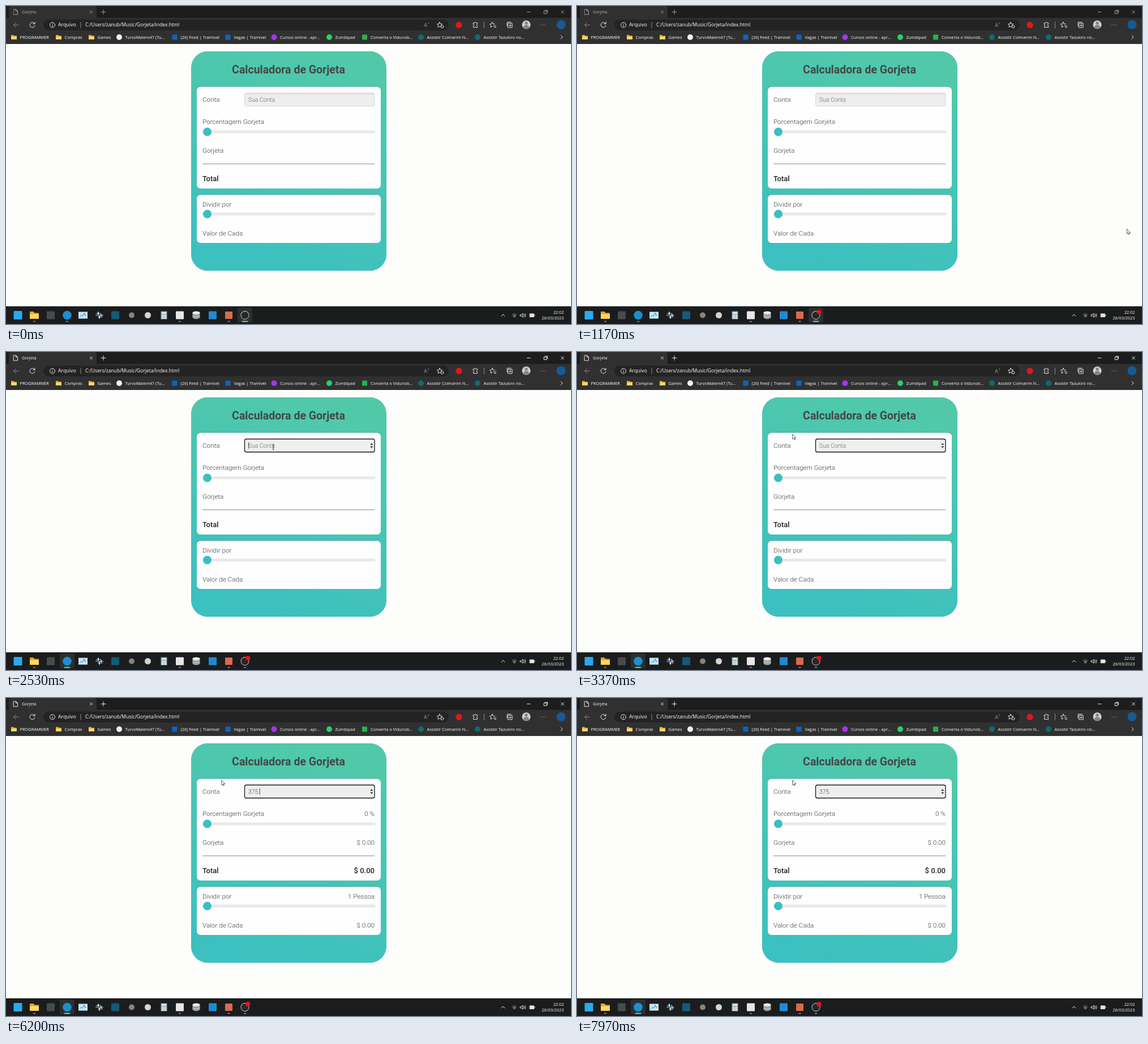
Write an HTML page that moves like this. It is 998 by 561 pixels and loops after 8 s.

```html
<!DOCTYPE html>
<html lang="pt">
<head>
<meta charset="utf-8">
<title>Gorjeta</title>
<style>
  html, body { margin: 0; height: 100%; overflow: hidden; background: #fdfdfc; }
  svg { display: block; width: 100vw; height: 100vh; }
  .ui { font: 7.4px "Open Sans", "Noto Sans", sans-serif; fill: #fff; }
  .page { font: 300 11.7px Roboto, sans-serif; fill: #3e3e3e; }
  .page .title { font-weight: 700; font-size: 19.5px; fill: #434846; text-anchor: middle; }
  .page .strong { font-weight: 500; font-size: 13px; fill: #222; }
  .page .entry { font-size: 10.4px; }
  .end { text-anchor: end; }
  .line { fill: none; stroke: #e6e6e6; stroke-width: 1; stroke-linecap: round; stroke-linejoin: round; }
  .dim { stroke: #888; }
  .panel { fill: #fefefe; filter: drop-shadow(0 -.3px .6px #4564); }
</style>
</head>
<body>
<svg viewBox="0 0 998 561" preserveAspectRatio="none">
  <defs>
    <linearGradient id="teal" x1=".35" y1="1" x2=".65" y2="0">
      <stop stop-color="#3cc0c0"/><stop offset="1" stop-color="#51c9a9"/>
    </linearGradient>
    <linearGradient id="inset" x2="0" y2="1">
      <stop stop-color="#d9d9d9"/><stop offset=".16" stop-color="#ededed"/><stop offset="1" stop-color="#efefef"/>
    </linearGradient>
  </defs>

  <!-- Browser -->
  <g class="ui">
    <path fill="#1d1d1d" d="M0 0H998V22H0Z"/>
    <path fill="#303030" d="M0 21H5V4Q5 0 9 0H156Q160 0 160 4V21H998V67H0Z"/>
    <rect x="66" y="24" width="716" height="19" rx="9.5" fill="#232323"/>
    <g id="titlebar">
      <path class="line" d="M13.5 6h4l3 3v6h-7zM17.5 6v3h3M148.500 8.500l4 4m0-4l-4 4M168 10.500h8m-4-4v8"/>
      <path class="line" d="M920.5 10.500h5.500M950.500 9h4.500v4.500h-4.500zM952 7.500h4.500v4.500M980.500 8l5 5m0-5l-5 5"/>
      <text x="28" y="13.2">Gorjeta</text>
    </g>
    <path class="line dim" d="M22.5 33.500h-9m4-4l-4 4 4 4"/>
    <path class="line" d="M50.5 31a4.500 4.500 0 1 0 .5 3.500M51 28.500v3h-3"/>
    <circle class="line" cx="82" cy="33.5" r="4.5"/>
    <path class="line" d="M82 33v3M82 31v.1"/>
    <text x="92" y="36.4" font-size="8.8">Arquivo</text>
    <path class="line dim" d="M132 28.500v10"/>
    <text x="140" y="36.4" font-size="8.57">C:/Users/zanub/Music/Gorjeta/index.html</text>
    <text x="738" y="37" font-size="9.5" fill="#999">A</text>
    <path class="line dim" d="M746 29q1.500 1.500 0 3"/>
    <g class="line">
      <path d="M766 28.500l1.400 3 3.200.4-2.300 2.300.6 3.200-2.900-1.600-2.900 1.600.6-3.200-2.300-2.300 3.200-.4z"/>
      <circle cx="770.5" cy="36.5" r="2.3" fill="#232323"/>
      <path d="M825.5 30h2.300a1.400 1.400 0 0 1 2.800 0h2v2.300a1.400 1.400 0 0 0 0 2.800v2.500h-7.100v-2.500a1.400 1.400 0 0 0 0-2.800z"/>
      <path class="dim" d="M844.5 28v11"/>
      <path d="M859 28.500l1.300 3 3.200.4M859 28.500l-1.400 3-3.200.4 2.300 2.300-.6 3.200 2.700-1.500M861 35h4.500m-3 2.500h3"/>
      <path d="M885 35.500v-6q0-1 1-1h6M887 30.500h7v7.500h-7zM890.500 32.500v3.500m-1.750-1.750h3.500"/>
    </g>
    <circle cx="919" cy="33" r="7.5" fill="#d2d0ce"/>
    <path fill="#87827f" d="M919 27.500a2.700 2.700 0 0 1 0 5.400 2.700 2.700 0 0 1 0-5.400M914 38q0-4.500 5-4.500t5 4.500q-5 4-10 0"/>
    <path class="line" d="M945 33.500v.01M948.500 33.500v.01M952 33.500v.01" stroke-width="1.6"/>
    <circle cx="800" cy="33.5" r="5.5" fill="#e5161d"/>
    <circle cx="980.5" cy="33" r="8" fill="#175a94"/>
    <g id="bookmarks"></g>
    <path class="line" d="M980 52l3 3-3 3"/>
  </g>

  <!-- Calculator -->
  <g class="page">
    <rect x="327" y="80" width="345" height="387" rx="29" fill="url(#teal)" style="filter:drop-shadow(0 .3px .7px #0005)"/>
    <text class="title" x="499" y="118.7">Calculadora de Gorjeta</text>
    <rect class="panel" x="337" y="142.5" width="325" height="179.5" rx="6.5"/>
    <rect class="panel" x="337" y="333" width="325" height="85" rx="6.5"/>
    <rect id="box" x="421.5" y="153.5" width="229.5" height="23" rx="3"/>
    <path id="spinner" fill="#333" d="M643.3 163.700l2.500-3.200 2.500 3.200zM643.300 166.200l2.500 3.200 2.500-3.200z"/>
    <text id="entry" class="entry" x="428" y="168.5"></text>
    <path id="caret" stroke="#222" stroke-width=".8" d="M0 159.500v11"/>
    <path stroke="#8d8d8d" d="M347 278.500H651"/>
    <g id="rows"></g>
  </g>

  <!-- Taskbar -->
  <g class="ui">
    <path fill="#1b1c1d" d="M0 529.700H998V561H0Z"/>
    <rect id="active" y="532" width="26" height="26" rx="3" fill="#2c2e2f"/>
    <g id="apps"></g>
    <circle id="recording" cx="427.5" cy="540" r="4" fill="#f01010"/>
    <path class="line" d="M875 547l3-3 3 3"/>
    <g class="line">
      <path class="dim" d="M894 544.500q4-3.500 8 0"/>
      <path d="M895.5 546.500q2.500-2 5 0M897 548.300q1-.8 2 0"/>
      <path d="M908.5 544.500h2l2.500-2.300v7l-2.500-2.300h-2zM915 544q1.500 1.700 0 3.500M916.800 542.500q2.700 3.200 0 6.500"/>
      <path fill="#e6e6e6" d="M925.5 543h7v5.500h-7zM934 545v1.500"/>
    </g>
    <text class="end" x="985.5" y="543">22:02</text>
    <text class="end" x="985.5" y="553">26/03/2023</text>
  </g>

  <path id="arrow" fill="#fff" stroke="#333" stroke-width=".8" d="M0 0V8.600L2 6.900 3.300 9.900 4.600 9.300 3.400 6.500H6.200Z"/>
  <path id="beam" fill="none" stroke="#222" stroke-width=".8" d="M-1.500 0h3M0 0v9M-1.500 9h3"/>
</svg>

<script>
const $ = id => document.getElementById(id);
const set = (id, attrs) => { for (const k in attrs) $(id).setAttribute(k, attrs[k]); };
const show = (id, on) => set(id, { visibility: on ? "visible" : "hidden" });

const circle = (x, y, r, color) => `<circle cx="${x}" cy="${y}" r="${r}" fill="${color}"/>`;
const square = (x, y, r, color) => `<rect x="${x - r}" y="${y - r}" width="${2 * r}" height="${2 * r}" rx="1" fill="${color}"/>`;
const folder = (x, y, r) =>
  `<path fill="#e0a526" d="M${x - r} ${y - r * .8}h${r * .8}l${r * .3} ${r * .3}h${r * .9}v${r * 1.3}h${-2 * r}z"/>` +
  `<path fill="#ffd766" d="M${x - r} ${y - r * .25}h${2 * r}v${r}h${-2 * r}z"/>`;

$("bookmarks").innerHTML = [
  [14, folder, "PROGRAMMER"],
  [93, folder, "Compras"],
  [151, folder, "Games"],
  [200, circle, "TurvoMalem47 (Tu...", "#f2f2f2"],
  [298, square, "(26) Feed | Tramivel", "#0a66c2"],
  [392, square, "Vagas | Tramivel", "#0a66c2"],
  [473.5, circle, "Cursos online - apr...", "#a435f0"],
  [571, circle, "Zumbipad", "#25d366"],
  [633.5, square, "Converta o Vidunob...", "#25b34b"],
  [733, circle, "Assistir Colmarim N...", "#0f6a72"],
  [833, circle, "Assistir Tazukiro no...", "#0f6a72"]
].map(([x, icon, label, color]) =>
  icon(x, 55, icon === square ? 4.5 : 5, color) + `<text x="${x + 10.5}" y="57.7">${label}</text>`).join("");

const calculator = (x, y) =>
  `<path fill="#8fa3ad" d="M${x - 5.5} ${y - 7}h11v14h-11z"/><path fill="#d8f0fb" d="M${x - 4} ${y - 5.5}h8v3h-8z"/>` +
  `<path stroke="#fff" stroke-width="2" stroke-dasharray="2 1" d="M${x - 4} ${y}h8M${x - 4} ${y + 2.7}h8M${x - 4} ${y + 5.3}h8"/>`;
const database = (x, y) =>
  `<path fill="#b9bbbd" d="M${x - 6.5} ${y - 4.5}v9q6.500 4.500 13 0v-9z"/><ellipse cx="${x}" cy="${y - 4.5}" rx="6.5" ry="2.5" fill="#eee"/>` +
  `<path fill="none" stroke="#777" d="M${x - 6.5} ${y - 1}q6.500 4 13 0m-13 4q6.500 4 13 0"/>`;
const mixer = (x, y) =>
  `<path stroke="#6f9fc8" stroke-width="1.3" d="M${x - 6} ${y - 3}h9M${x - 7} ${y}h14M${x - 3} ${y + 3}h9"/>` +
  `<path stroke="#ddd" stroke-width="2" d="M${x - 2} ${y - 6}v5M${x + 3} ${y - 2}v4M${x} ${y + 1}v5"/>`;
const chart = (x, y) =>
  `<path fill="#c9e6f5" d="M${x - 8} ${y - 6}h16v12h-16z"/>` +
  `<path fill="none" stroke="#2787b8" d="M${x - 6} ${y + 3}l3-3 2 2 3-6 2 5 2-2"/>`;

$("apps").innerHTML = [
  [21, square, 7.5, "#2aa9ee"], [50, folder, 8], [79, square, 7, "#474b4e"], [108, circle, 7.8, "#1d8fce"],
  [136, chart], [165, mixer], [193, square, 7, "#145a78"], [222, circle, 5, "#8a8378"],
  [250.5, circle, 5.5, "#d4d4d4"], [279, calculator], [307, square, 7, "#e9e5e6"], [336, database],
  [365, square, 7, "#1f8ad2"], [393.5, square, 6.5, "#d86b4c"], [422, circle, 7.5, "#d2d2d2"]
].map(([x, icon, ...style]) => icon(x, 545.5, ...style)).join("") +
  circle(422, 545.5, 6.6, "#25282a") +
  [50, 108, 307, 393.5, 422].map(x => `<path stroke="#92979a" stroke-width="1.5" stroke-linecap="round" d="M${x - 1.5} 556.500h3"/>`).join("") +
  `<path id="underline" stroke="#46dca2" stroke-width="2" stroke-linecap="round" d="M0 556.500h9"/>`;

const slider = y =>
  `<rect x="347" y="${y - 2.5}" width="305.5" height="5" rx="2.5" fill="#e9e9e9"/>` + circle(355.5, y, 7.5, "#3bbfc2");
$("rows").innerHTML = slider(222) + slider(367) + [
  ["Conta", 169, "none"], ["Porcentagem Gorjeta", 208, "percent"], ["Gorjeta", 259.3, "tip"],
  ["Total", 308.5, "total"], ["Dividir por", 354, "people"], ["Valor de Cada", 404.5, "each"]
].map(([label, y, id]) => {
  const strong = id === "total" ? "strong" : "";
  return `<text class="${strong}" x="347" y="${y}">${label}</text><text id="${id}" class="end ${strong}" x="651" y="${y}"></text>`;
}).join("");

const LOOP = 8000, RECORD = 450, CLICK = 2360, ACTIVATE = 2530, BLINK = 530;
// time, typed text, resulting amount
const typing = [[3960, "3", 3], [4330, "37", 37], [4850, "375", 375], [6000, "375.", 0]];
// time, x, y of the pointer
const route = [
  [1040, 1000, 412], [1170, 972, 393.7], [1600, 720, 270], [2030, 485.7, 180.5],
  [2280, 472, 163], [2600, 472, 163], [2950, 380.7, 145]
];

function pointerAt(t) {
  const i = route.findIndex(p => p[0] > t);
  if (i < 0) return route.at(-1).slice(1);
  if (i === 0) return route[0].slice(1);
  const [t0, x0, y0] = route[i - 1], [t1, x1, y1] = route[i];
  const k = (t - t0) / (t1 - t0);
  return [x0 + (x1 - x0) * k, y0 + (y1 - y0) * k];
}

function draw(t) {
  const focused = t >= CLICK;
  const typed = typing.findLast(step => step[0] <= t);
  const [since, text, amount] = typed || [CLICK, "", 0];
  const money = "$ " + amount.toFixed(2);

  $("entry").textContent = text || "Sua Conta";
  set("entry", { fill: text ? "#484848" : "#6c6c6c" });
  const values = { percent: "0 %", tip: "$ 0.00", total: money, people: "1 Pessoa", each: money };
  for (const id in values) $(id).textContent = typed ? values[id] : "";

  set("box", focused
    ? { fill: "#efefef", stroke: "#171717", "stroke-width": 1.3 }
    : { fill: "url(#inset)", stroke: "#d0d0d0", "stroke-width": .8 });
  show("spinner", focused);
  show("caret", focused && Math.floor((t - since) / BLINK) % 2 === 0);
  const width = text ? $("entry").getComputedTextLength() : 0;
  set("caret", { transform: `translate(${428.5 + width})` });

  set("titlebar", { opacity: t < ACTIVATE ? .62 : 1 });
  const appX = focused ? 108 : 422;
  set("active", { x: appX - 13 });
  set("underline", { transform: `translate(${appX - 4.5})` });
  show("recording", t >= RECORD);

  const [x, y] = pointerAt(t);
  const overBox = x > 421 && x < 651 && y > 153 && y < 177;
  show("arrow", t >= route[0][0] && !overBox);
  show("beam", overBox);
  for (const id of ["arrow", "beam"]) set(id, { transform: `translate(${x} ${y})` });
}

function frame() {
  draw(performance.now() % LOOP);
  requestAnimationFrame(frame);
}
frame();
</script>
</body>
</html>
```
